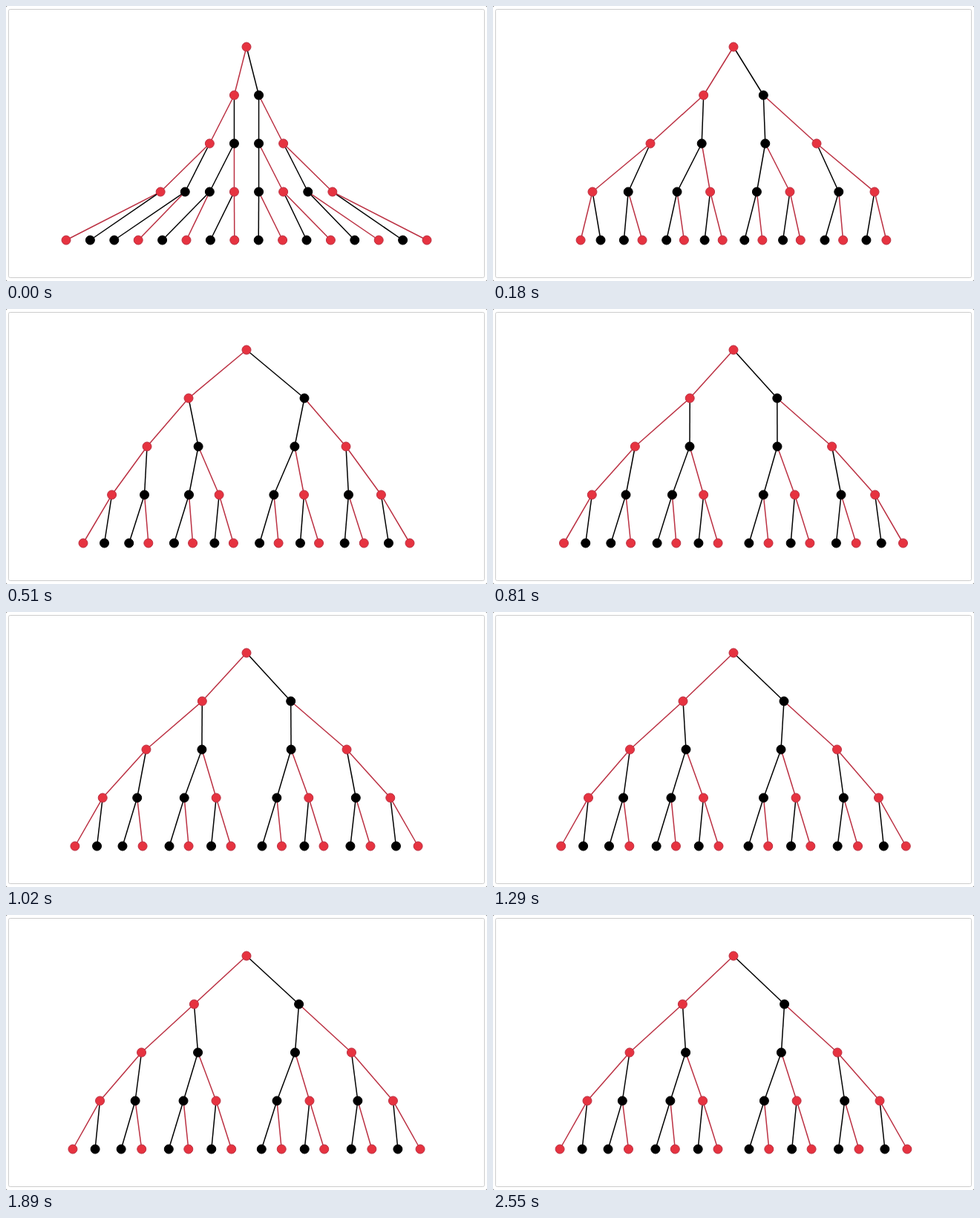
These frames come from a looping animation (648 by 370 pixels, 2.58 s). An HTML page:

```html
<!DOCTYPE html>
<html lang="en">
<head>
<meta charset="utf-8">
<title>Settling binary tree</title>
<style>
html, body { margin: 0; width: 100%; height: 100%; overflow: hidden; background: #555; }
svg { display: block; width: 648px; height: 370px; }
</style>
</head>
<body>
<svg viewBox="0 0 648 370">
  <rect width="648" height="370" rx="2" fill="#fff"/>
  <rect x="3.5" y="4.5" width="641" height="361" rx="2" fill="none" stroke="#ccc"/>
  <g id="edges" stroke-width="1.5"></g>
  <g id="dots"></g>
</svg>
<script>
const STEP = 30, STEPS = 86, MID = 324, TOP = 55, ROW = 65;
const COLORS = 'r' + 'rb' + 'rbbr' + 'rbbrbrbr' + 'rbbrbrbrbrbrbrbr';
const RED = '#e63340', DARK_RED = '#bb3042';

// Each row swings between key times; inner and outer are the distances
// of its innermost and outermost dots from the middle.
const TIMES = [0, 6, 17, 27, 43, 85];
const ROWS = [
  { pitch: 33.1, outer: [40.3, 78, 58.8, 68, 68.6] },
  { pitch: 33.1, inner: [42.8, 64.9, 59, 64, 64.4],
    outer: [112, 134, 132.6, 139.5, 140] },
  { pitch: 33.1, inner: [31.4, 36.9, 40.3, 40.5, 41.4],
    outer: [190, 181.4, 190.7, 195.5, 197], between: [0.281, 0.696] },
  { pitch: 32.4, inner: [14.8, 17.6, 20.9, 20, 21],
    outer: [205.9, 220, 228.5, 232.3, 233.9],
    between: [0.126, 0.271, 0.395, 0.566, 0.695, 0.859] }
];

// Smooth curve through the values at TIMES, at rest at the end
function curve(vs) {
  const last = TIMES.length - 1;
  const gap = k => TIMES[k + 1] - TIMES[k];
  const rate = k => (vs[k + 1] - vs[k]) / gap(k);
  const slope = vs.map((v, k) => {
    if (k === 0) return rate(0) / 2;
    if (k === last) return 0;
    return (gap(k) * rate(k - 1) + gap(k - 1) * rate(k)) / (gap(k - 1) + gap(k));
  });
  return t => {
    let k = 0;
    while (k < last - 1 && t > TIMES[k + 1]) k++;
    const h = gap(k), u = (t - TIMES[k]) / h, w = 1 - u;
    return w * w * ((1 + 2 * u) * vs[k] + u * h * slope[k]) +
      u * u * ((3 - 2 * u) * vs[k + 1] - w * h * slope[k + 1]);
  };
}

const rows = ROWS.map(({ pitch, outer, inner = outer, between = [] }, r) => {
  const half = 2 ** r;
  return {
    inner: curve([pitch / 2, ...inner]),
    outer: curve([pitch * (half - 0.5), ...outer]),
    even: Array.from({ length: half }, (_, i) => half > 1 ? i / (half - 1) : 0),
    settled: half > 1 ? [0, ...between, 1] : [0]
  };
});

// All x positions, row by row from the root
function layout(s) {
  const x = [MID], mix = Math.min(1, s / TIMES[1]);
  for (const row of rows) {
    const a = row.inner(s), b = row.outer(s);
    const dist = row.even.map((e, i) => a + (b - a) * (e + (row.settled[i] - e) * mix));
    x.push(...dist.map(d => MID - d).reverse(), ...dist.map(d => MID + d));
  }
  return x;
}

function add(group, tag, attrs) {
  const el = document.createElementNS('http://www.w3.org/2000/svg', tag);
  for (const name in attrs) el.setAttribute(name, attrs[name]);
  return document.getElementById(group).appendChild(el);
}

const parent = i => (i - 1) >> 1;
const rowY = i => TOP + ROW * Math.floor(Math.log2(i + 1));

const nodes = [...COLORS].map((c, i) => {
  const red = c === 'r', stroke = red ? DARK_RED : '#000';
  return {
    dot: add('dots', 'circle', { cy: rowY(i), r: 6, fill: red ? RED : '#000', stroke }),
    edge: i ? add('edges', 'line', { y1: rowY(parent(i)), y2: rowY(i), stroke }) : null
  };
});

function draw(ms) {
  const x = layout(Math.floor(ms / STEP) % STEPS);
  nodes.forEach(({ dot, edge }, i) => {
    dot.setAttribute('cx', x[i]);
    if (!edge) return;
    edge.setAttribute('x1', x[parent(i)]);
    edge.setAttribute('x2', x[i]);
  });
}

function loop() {
  draw(performance.now());
  requestAnimationFrame(loop);
}
loop();
</script>
</body>
</html>
```
